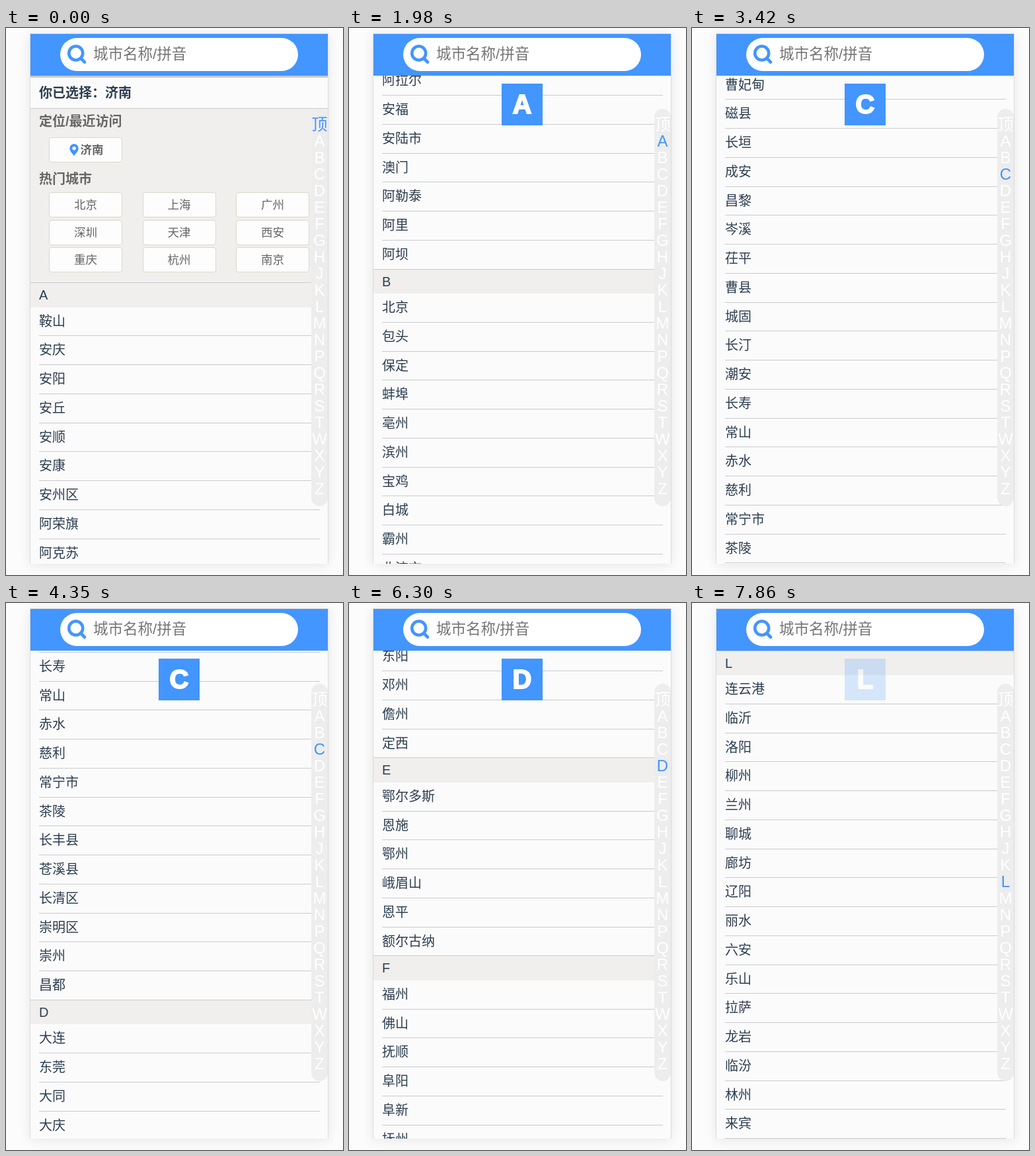
Recreate the animation shown at these times as an HTML page. Size 510 by 826 pixels, loop 8000 ms.

```html
<!DOCTYPE html>
<html lang="zh-CN">
<head>
<meta charset="utf-8">
<style>
* { box-sizing: border-box; }
html, body { margin: 0; width: 100%; height: 100%; overflow: hidden; background: #fcfcfc; }
body { position: relative; font: 20px "Liberation Sans", "Noto Sans CJK SC", "Noto Sans CJK", sans-serif; color: #2c3e50; }
div, svg { position: absolute; white-space: nowrap; }
#phone { left: 36px; top: 8px; width: 452px; height: 801px; background: #fbfbfb;
  border: solid #dcdcdc; border-width: 1px 1px 0; box-shadow: 0 2px 18px rgba(0,0,0,.09); }
#bar { left: 37px; top: 9px; width: 450px; height: 63px; background: #4395ff; }
#search { left: 45px; top: 6px; width: 360px; height: 50px; border-radius: 25px; background: #fff;
  padding-left: 50px; font-size: 22.5px; line-height: 49px; color: #757575; }
#view { left: 37px; top: 72px; width: 450px; height: 737px; overflow: hidden; }
#list { left: 0; top: 0; width: 450px; }
#chosen { top: 0; width: 450px; height: 50px; border-top: 3px solid #cdc8c5; border-bottom: 1px solid #ccc;
  padding-left: 13px; line-height: 46px; font-weight: bold; }
#hot { top: 50px; width: 450px; height: 262px; background: #f0efed; color: #666; }
.title { left: 13px; font-weight: bold; line-height: 30px; }
.city { width: 111px; height: 38px; border: 1px solid #dcd8ca; border-radius: 4px; background: #fdfdfd;
  font-size: 17.5px; line-height: 36px; text-align: center; }
.head { width: 450px; height: 37.5px; border-top: 1px solid #ccc; background: #f0efed; padding-left: 13px; line-height: 37px; }
.row { left: 13px; width: 425px; height: 43.75px; border-bottom: 1px solid #c9cbcd; line-height: 43px; font-weight: 350; }
.row.last { border: 0; }
#index { left: 462px; top: 122px; width: 25px; height: 600px; border-radius: 12.5px; background: #ededed; color: #fff; font-size: 24px; }
#index div { width: 25px; height: 25px; line-height: 25px; display: flex; justify-content: center; }
#badge { left: 231px; top: 84px; width: 62px; height: 63px; background: #4395ff; color: #fff;
  font-size: 40px; font-weight: bold; line-height: 62px; text-align: center; -webkit-text-stroke: 2px #fff; }
</style>
</head>
<body>
<div id="phone"></div>
<div id="view"><div id="list"></div></div>
<div id="bar">
  <div id="search">城市名称/拼音
    <svg style="left:10px;top:9px" width="32" height="32" fill="none" stroke="#4395ff" stroke-width="4.6" stroke-linecap="round">
      <circle cx="13.7" cy="14" r="10.5"/><path d="M21.5 22L27 27.5"/></svg>
  </div>
</div>
<div id="index"></div>
<div id="badge"></div>
<script>
const $ = id => document.getElementById(id);
const LOOP = 8000, ROW = 43.75, HEAD = 37.5, BLUE = '#4395ff';
const cities = {
  A: '鞍山 安庆 安阳 安丘 安顺 安康 安州区 阿荣旗 阿克苏 安吉 安溪 安宁 安国 安平 安新 安化 安岳 安远 安泽 阿图什 阿尔山 阿拉尔 安福 安陆市 澳门 阿勒泰 阿里 阿坝',
  B: '北京 包头 保定 蚌埠 亳州 滨州 宝鸡 白城 霸州 北流市 本溪 白山 毕节 百色 北海 巴中 保山 白银 巴彦淖尔 北票 博罗 宝应 博兴 泊头 宾阳 北安',
  C: '重庆 成都 长沙 长春 常州 沧州 常德 郴州 承德 赤峰 滁州 潮州 朝阳 长治 常熟 慈溪 崇左 池州 楚雄 昌吉 巢湖 长葛 曹妃甸 磁县 长垣 成安 昌黎 岑溪 茌平 曹县 城固 长汀 潮安 长寿 常山 赤水 慈利 常宁市 茶陵 长丰县 苍溪县 长清区 崇明区 崇州 昌都',
  D: '大连 东莞 大同 大庆 德州 东营 丹东 德阳 达州 大理 定州 丹阳 东阳 邓州 儋州 定西',
  E: '鄂尔多斯 恩施 鄂州 峨眉山 恩平 额尔古纳',
  F: '福州 佛山 抚顺 阜阳 阜新 抚州 防城港 福清 富阳 肥城 福鼎 丰城',
  G: '广州 贵阳 桂林 赣州 广元 贵港 固原 广安 高州 高碑店 高密 巩义 高邮 广饶 光山县 桂平 公主岭 光泽 广汉 藁城 高平 固始县 个旧 公安 灌云 灌南 高唐',
  H: '杭州 哈尔滨 合肥 海口 惠州 邯郸 呼和浩特 衡阳 湖州 淮安 菏泽 衡水 黄石 怀化 黄冈 河源 汉中 淮南',
  J: '济南 济宁 嘉兴 金华 吉林 江门 荆州 九江 焦作 锦州 晋中 揭阳 吉安 景德镇 晋城 江阴',
  K: '昆明 开封 昆山 克拉玛依 喀什 凯里 开平 垦利',
  L: '连云港 临沂 洛阳 柳州 兰州 聊城 廊坊 辽阳 丽水 六安 乐山 拉萨 龙岩 临汾 林州 来宾 吕梁 娄底 陇南 漯河 泸州',
  M: '绵阳 茂名 牡丹江 马鞍山 梅州 眉山 密山 蒙自',
  N: '南京 宁波 南宁 南昌 南通 南阳 南充 宁德 内江 南平',
  P: '平顶山 莆田 盘锦 濮阳 萍乡 攀枝花 普洱 平凉',
  Q: '青岛 泉州 秦皇岛 齐齐哈尔 清远 曲靖 衢州 钦州 潜江 曲阜',
  R: '日照 瑞安 如皋 乳山 荣成 任丘 仁怀',
  S: '上海 深圳 沈阳 石家庄 苏州 绍兴 汕头 商丘 十堰 三亚 韶关 上饶 宿迁 邵阳 遂宁 随州',
  T: '天津 太原 唐山 台州 泰安 泰州 通辽 铁岭 铜陵 通化 天水 铜仁',
  W: '武汉 无锡 温州 潍坊 芜湖 威海 乌鲁木齐 渭南 梧州 温岭 乌海',
  X: '西安 厦门 徐州 襄阳 邢台 新乡 西宁 许昌 咸阳 湘潭 孝感 信阳 宣城 忻州',
  Y: '烟台 扬州 盐城 银川 宜昌 岳阳 运城 营口 宜宾 玉林 榆林 阳江 义乌 永州',
  Z: '郑州 淄博 珠海 镇江 湛江 株洲 中山 周口 枣庄 漳州 舟山 肇庆 张家口 遵义 张家港 诸暨 涿州 章丘 资阳 自贡'
};
const letters = ['顶', ...Object.keys(cities)];
const box = (cls, x, y, text) => `<div class="${cls}" style="left:${x}px;top:${y}px">${text}</div>`;

// Fixed block above the alphabetical sections
const pin = `<svg style="left:29px;top:8px" width="16" height="20"><path fill="${BLUE}" fill-rule="evenodd"
  d="M8 1a6.7 6.7 0 0 0-6.7 6.7C1.3 12 6 16 8 19c2-3 6.7-7 6.7-11.3A6.7 6.7 0 0 0 8 1zm0 4a2.7 2.7 0 1 1 0 5.4a2.7 2.7 0 0 1 0-5.4z"/></svg>`;
let html = '<div id="chosen">你已选择：济南</div><div id="hot">' +
  box('title', 13, 4, '定位/最近访问') + box('title', 13, 91, '热门城市') +
  box('city', 28, 43, pin + '<b style="margin-left:19px">济南</b>');
'北京 上海 广州 深圳 天津 西安 重庆 杭州 南京'.split(' ').forEach((name, i) => {
  html += box('city', 28 + 141.5 * (i % 3), 126 + 41.5 * (i / 3 | 0), name);
});
html += '</div>';

// Sections; tops holds the list position of each letter and city
const tops = { '顶': 0 };
let y = 312;
for (const key in cities) {
  tops[key] = y;
  html += box('head', 0, y, key);
  y += HEAD;
  cities[key].split(' ').forEach((name, i, all) => {
    tops[name] = y;
    html += box('row' + (i == all.length - 1 ? ' last' : ''), 13, y, name);
    y += ROW;
  });
  y -= 1;
}
$('list').innerHTML = html;
$('index').innerHTML = letters.map((c, i) => box('', 0, 11 + 25 * i, c)).join('');
const marks = [...$('index').children];

// [time, scroll, ease-out power]
const at = (name, stageY = 72) => tops[name] - (stageY - 72);
const moves = [
  [840, 0, 1], [1620, at('安福', 540), 2], [1740, at('安福', 540), 1],
  [1980, at('安福', 104), 1.2], [2640, at('本溪'), 1.6], [3420, at('磁县', 109), 1.6],
  [4350, at('常山', 120), 1.3], [4620, at('长清区'), 1.5], [4920, at('Z'), 2],
  [5700, at('Z'), 1], [6000, at('D'), 2],
  [6150, at('D'), 1], [6960, at('高州', 112), 1.7], [7050, at('高碑店', 120), 1], [7320, at('L'), 2]
];
function scrollAt(t) {
  const i = moves.findIndex(m => m[0] > t);
  if (i < 0) return moves[moves.length - 1][1];
  if (!i) return 0;
  const [t0, a] = moves[i - 1], [t1, b, power] = moves[i];
  return a + (b - a) * (1 - (1 - (t - t0) / (t1 - t0)) ** power);
}
// The badge fades shortly after scrolling ends
function badgeAlpha(t) {
  if (t < 840) return 0;
  const dt = t >= 7440 ? t - 7440 : t >= 5040 && t < 5700 ? t - 5040 : 0;
  return dt < 480 ? Math.exp(-dt / 260) : t >= 7440 ? .2 : 0;
}
function draw(now) {
  const t = now % LOOP, s = Math.round(scrollAt(t));
  $('list').style.transform = `translateY(${-s}px)`;
  const current = letters.filter(c => tops[c] <= s + 1).pop();
  marks.forEach(m => m.style.color = m.textContent == current ? BLUE : '');
  $('badge').textContent = current;
  $('badge').style.opacity = badgeAlpha(t);
  requestAnimationFrame(draw);
}
draw(performance.now());
</script>
</body>
</html>
```
